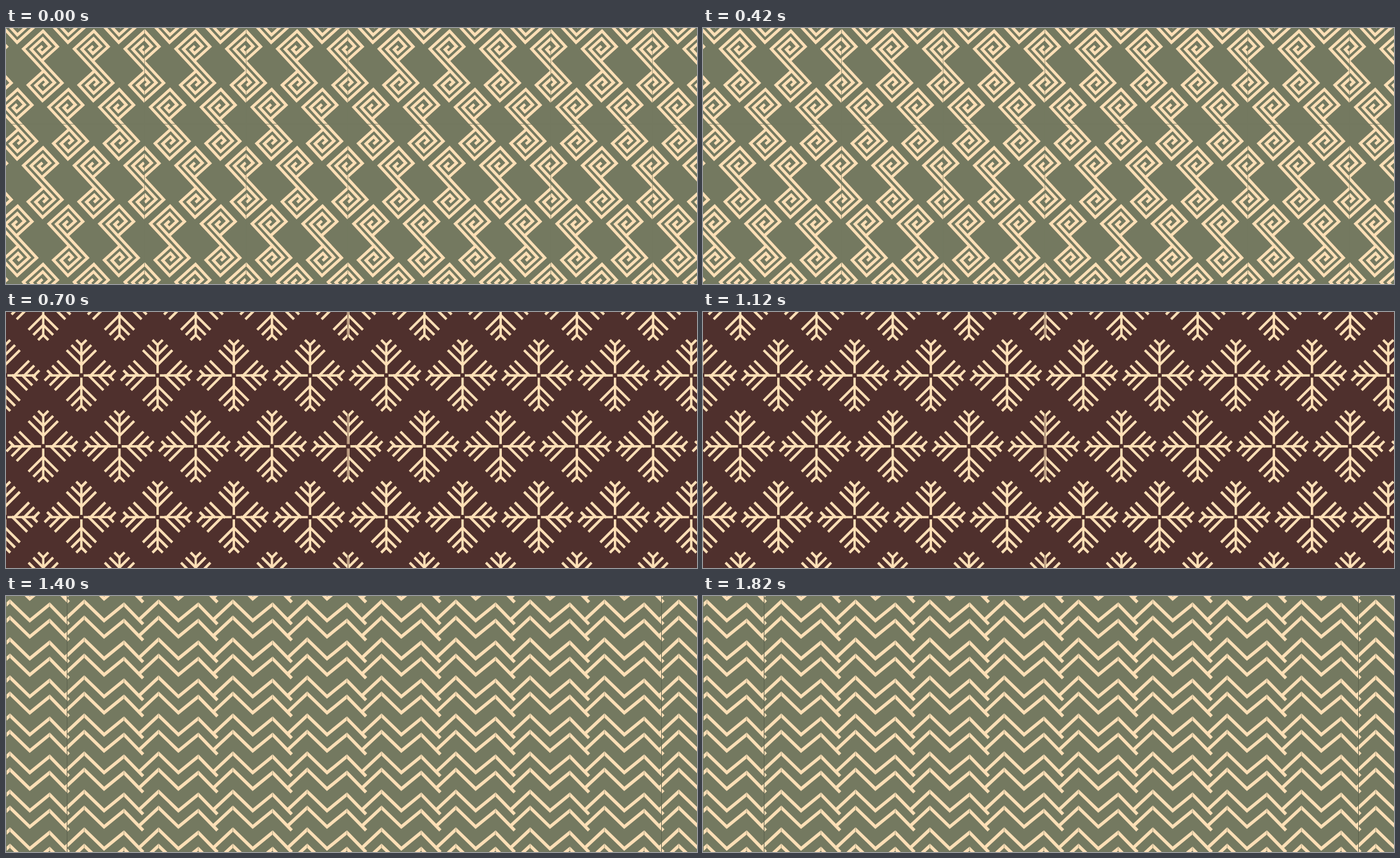
These frames come from a looping animation (1080 by 400 pixels, 2100 ms). An HTML page:

```html
<!DOCTYPE html>
<html lang="en">
<head>
<meta charset="utf-8">
<title>Pattern loop</title>
<style>
  html, body { margin: 0; width: 100%; height: 100%; overflow: hidden; }
  svg { display: block; width: 100vw; height: 100vh; }
  path { fill: none; stroke: #fddfb6; stroke-miterlimit: 6; }
</style>
</head>
<body>
<svg id="stage" viewBox="0 0 1080 400" preserveAspectRatio="none"></svg>
<script>
const HOLD = 700;
const W = 1080, H = 400;
const OLIVE = '#747960', BROWN = '#4f302d';
const stage = document.getElementById('stage');

function add(parent, tag, attrs) {
  const el = document.createElementNS('http://www.w3.org/2000/svg', tag);
  for (const key in attrs) el.setAttribute(key, attrs[key]);
  parent.append(el);
  return el;
}

const poly = pts => 'M' + pts.map(p => p.map(n => n.toFixed(2)).join(' ')).join('L');

function scene(color) {
  const g = add(stage, 'g', { visibility: 'hidden' });
  add(g, 'rect', { width: W, height: H, fill: color });
  return g;
}

function seam(g, x1, y1, x2, y2, color, width, opacity = 1) {
  add(g, 'line', { x1, y1, x2, y2, stroke: color, 'stroke-width': width, opacity });
}

// Repeats a motif over the stage; odd rows move sideways by `shift`.
function tile(g, draw, x0, y0, dx, dy, shift) {
  for (let r = -2; y0 + r * dy < H + dy; r++) {
    for (let c = -2; x0 + c * dx < W + dx; c++) {
      const x = x0 + c * dx + (r & 1 ? shift : 0);
      draw(add(g, 'g', { transform: `translate(${x.toFixed(2)} ${(y0 + r * dy).toFixed(2)})` }));
    }
  }
}

function spirals() {
  const g = scene(OLIVE);
  const pitch = 8.3, reach = 40;
  // From the inner end outwards, in pitches along the two slanted axes.
  const turns = [[2, 3], [2, 2], [3, 2], [3, 4], [1, 4], [1, 1], [4, 1], [4, 5], [0, 5], [0, 0], [5.64, 0]];
  const top = turns.map(([a, b]) => {
    const u = a * pitch - reach, v = (b - 0.5) * pitch;
    return [0.68 * u + 0.74 * v, 0.735 * u - 0.67 * v];
  });
  const bottom = top.map(([x, y]) => [-x, -y]);
  const d = poly(top) + poly(bottom);
  tile(g, m => add(m, 'path', { d, 'stroke-width': 4.5 }), 57.5, 59.2, 79.42, 91.1, 39.7);
  for (const x of [216.5, 375.3, 534.2, 851.5, 1010.3]) seam(g, x, 0, x, H, OLIVE, 0.8, 0.8);
  seam(g, 0, 150.3, W, 150.3, OLIVE, 1, 0.8);
  return g;
}

function flakes() {
  const g = scene(BROWN);
  // Angle of each arm, then where the first barb leaves the stem on either side.
  const arms = [[0, 14.5, 11.5], [90, 16.5, 16.5], [180, 18.5, 14.5], [270, 16.5, 16.5]];
  const barbs = (start, side) => [23, 15.5, 8].map((len, i) => {
    const s = start + i * 15.5;
    return poly([[s - 1, -side], [s + len, side * len]]);
  }).join('');
  const draw = m => {
    for (const [angle, left, right] of arms) {
      const a = add(m, 'g', { transform: `rotate(${angle})` });
      add(a, 'path', { d: 'M3.5 0H48', 'stroke-width': 3.7 });
      add(a, 'path', { d: barbs(left, -1) + barbs(right, 1), 'stroke-width': 4 });
    }
    add(m, 'rect', { x: -2.5, y: -2.5, width: 5, height: 5, fill: BROWN });
  };
  tile(g, draw, 58.2, -11.6, 119.15, 110.7, 59.6);
  seam(g, 534.5, 0, 534.5, H, BROWN, 0.9);
  return g;
}

function zigzags() {
  const g = scene(OLIVE);
  const d = poly([[-31, 29], [0, 0], [31, 30], [62, 4.7], [92, 35.5]]);
  const draw = m => {
    for (const y of [0, 25.3]) {
      add(m, 'path', { d, transform: `translate(0 ${y})`, 'stroke-width': 5 });
      seam(m, 0, y - 4, 0, y + 6, OLIVE, 0.7, 0.7);
      seam(m, 62, y + 1, 62, y + 11, OLIVE, 0.7, 0.7);
    }
  };
  tile(g, draw, 122.3, 8.4, 116.15, 59.4, 0);
  seam(g, 0.5, 0, 0.5, H, OLIVE, 1);
  for (const x of [95.5, 1024.5]) seam(g, x, 0, x, H, '#5d624e', 1);
  return g;
}

const scenes = [spirals(), flakes(), zigzags()];

function render(t) {
  const now = Math.floor(t / HOLD) % scenes.length;
  scenes.forEach((g, i) => g.setAttribute('visibility', i === now ? 'visible' : 'hidden'));
}

const start = performance.now();
function tick() {
  render(performance.now() - start);
  requestAnimationFrame(tick);
}
tick();
</script>
</body>
</html>
```
